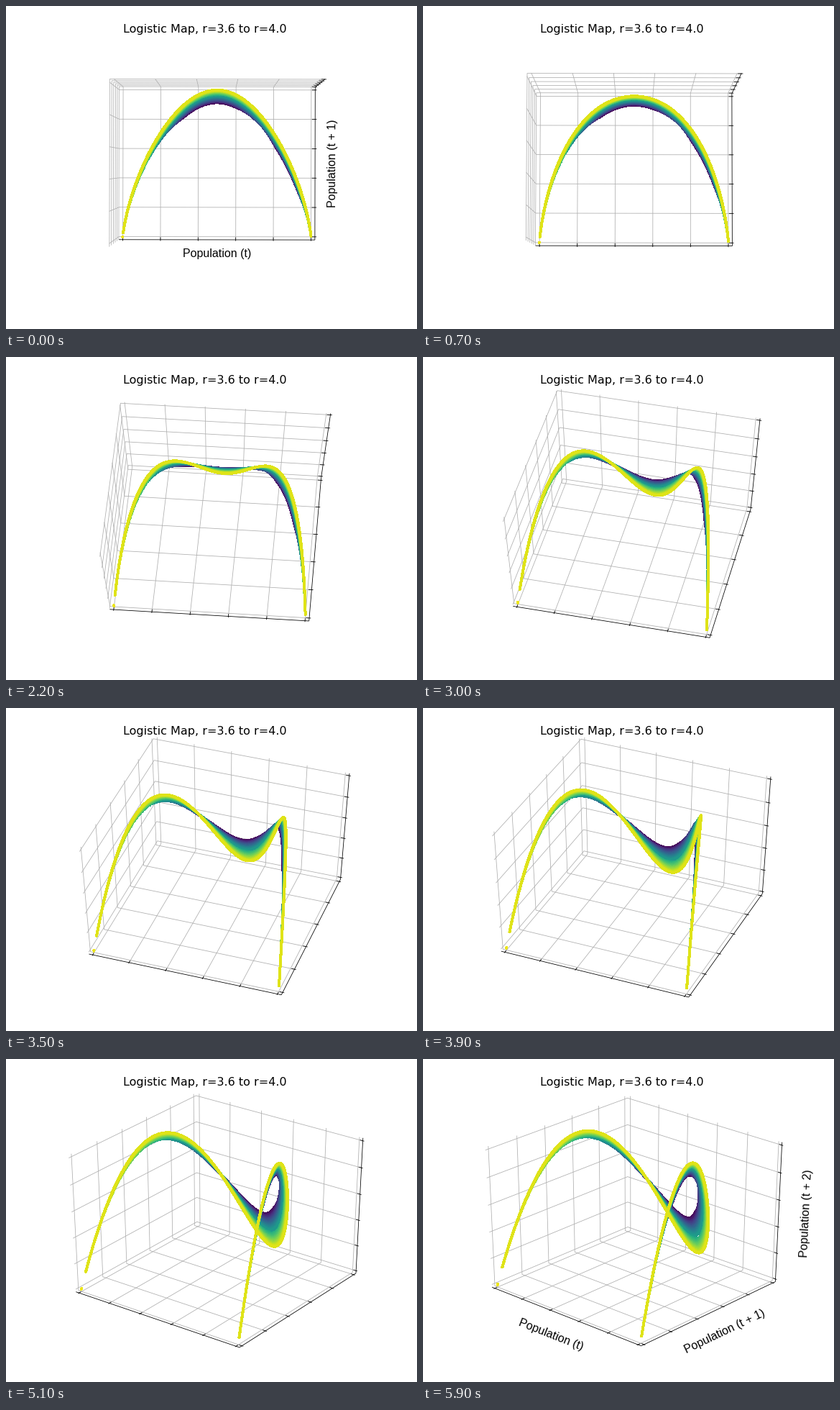
A matplotlib script that plays this animation: 572x449 px, repeating every 6.13 s.

```python
import matplotlib.pyplot as plt
import numpy as np
from matplotlib.animation import FuncAnimation
from matplotlib.collections import LineCollection

W, H, DPI = 572, 449, 72
LOOP_MS, FRAMES = 6130, 123

# Perspective: scale and centre of the plot area in pixels
SCALE = np.array([558, 434.88]) / 0.185
CENTER = 7.2 + SCALE * 0.095
DIST = 11.0

# Camera moves: (steps, elevation drop per step, azimuth gain per step)
MOVES = [(3, 0.5, 0), (14, 1.0, 0), (24, 1.5, 1.1),
         (4, 1.0, 1.1), (9, 0.5, 1.1), (3, 0.2, 0.5)]
COUNTS, DROPS, TURNS = zip(*MOVES)
ELEV = 89.9 - np.append(0, np.cumsum(np.repeat(DROPS, COUNTS)))
AZIM = 270.1 + np.append(0, np.cumsum(np.repeat(TURNS, COUNTS)))
FINAL_SLOT = len(ELEV) + 1

# Box edges, ticks and labels
LO, HI = -1 / 48, 49 / 48
FAR, NEAR = (LO, HI, LO), (HI, LO, HI)
EDGES = [(LO, LO, LO), (HI, LO, LO), (HI, HI, LO)]
TICKS = np.linspace(0, 1, 6)
TICK_DIRS = [(1, 1), (0, -1), (0, -1)]
DELTA = 1 / 12
LABEL_SHIFT = 25 * 48 / (558 + 434.88) * DELTA
NAMES = ["Population (t)", "Population (t + 1)", "Population (t + 2)"]


def project(points, elev, azim):
    """Perspective view of unit-cube points, in pixels."""
    x, y, z = np.moveaxis(np.asarray(points, float) - 0.5, -1, 0)
    e, a = np.radians([elev, azim])
    toward = x * np.cos(a) + y * np.sin(a)
    right = y * np.cos(a) - x * np.sin(a)
    up = z * np.cos(e) - toward * np.sin(e)
    depth = DIST - toward * np.cos(e) - z * np.sin(e)
    return CENTER + SCALE * np.stack([right, up], -1) / depth[..., None]


def moved(point, axis, value):
    result = list(point)
    result[axis] = value
    return result


def orbit(rate, count=4000, discard=100):
    x, values = 0.5, []
    for _ in range(count):
        values.append(x)
        x = rate * x * (1 - x)
    return np.sort(values[discard:])


def attractor(rate, gap=0.008, pad=2e-4):
    """Pieces of the delay curve (x, f(x), f(f(x))) that the orbit visits."""
    pieces = []
    xs = orbit(rate)
    for run in np.split(xs, np.flatnonzero(np.diff(xs) > gap) + 1):
        lo, hi = run[0] - pad, run[-1] + pad
        x = np.linspace(lo, hi, 3 + int((hi - lo) * 160))
        y = rate * x * (1 - x)
        pieces.append(np.stack([x, y, rate * y * (1 - y)], -1))
    return pieces


def build_grid():
    lines = []
    for axis in range(3):
        for value in TICKS:
            corner = moved(FAR, axis, value)
            b, c = (axis + 1) % 3, (axis + 2) % 3
            lines.append([moved(corner, b, NEAR[b]), corner,
                          moved(corner, c, NEAR[c])])
    return lines


def build_axes():
    lines = []
    for axis, (edge, (side, sign)) in enumerate(zip(EDGES, TICK_DIRS)):
        lines.append([moved(edge, axis, LO), moved(edge, axis, HI)])
        for value in TICKS:
            base = moved(edge, axis, value)
            lines.append([moved(base, side, base[side] + k * sign * DELTA)
                          for k in (0.2, -0.1)])
    return lines


def label_anchor(axis):
    point = [c + (LABEL_SHIFT if c > 0.5 else -LABEL_SHIFT)
             for c in EDGES[axis]]
    return moved(point, axis, 0.5)


def upright(angle):
    angle %= 180
    return angle - 180 if angle > 90 else angle


fig = plt.figure(figsize=(W / DPI, H / DPI), dpi=DPI, facecolor="white")
ax = fig.add_axes([0, 0, 1, 1])
ax.set(xlim=(0, W), ylim=(0, H))
ax.axis("off")

curves, colors = [], []
rates = np.linspace(3.6, 4.0, 50)
for rate, color in zip(rates, plt.cm.viridis(np.linspace(0, 0.97, 50))):
    pieces = attractor(rate)
    curves += pieces
    colors += [color] * len(pieces)

grid_lines, axis_lines = build_grid(), build_axes()
grid = LineCollection([], colors="#b0b0b0", linewidths=0.8, zorder=1)
frame_art = LineCollection([], colors="black", linewidths=0.8, zorder=2)
ribbon = LineCollection([], colors=colors, linewidths=3, capstyle="round",
                        antialiaseds=False, zorder=3)
layers = [(grid, grid_lines), (frame_art, axis_lines), (ribbon, curves)]
for art, _ in layers:
    ax.add_collection(art, autolim=False)

labels = [ax.text(0, 0, name, family="Liberation Sans", size=16,
                  ha="center", va="center", rotation_mode="default")
          for name in NAMES]
ax.text(277.2, 424.5, "Logistic Map, r=3.6 to r=4.0",
        family="DejaVu Sans", size=16, ha="center", va="top")


def update(frame):
    slot = frame // 2
    step = int(np.clip(slot - 1, 0, len(ELEV) - 1))
    view = ELEV[step], AZIM[step]
    for art, lines in layers:
        art.set_segments([project(line, *view) for line in lines])

    # Labels only show while the camera rests
    shown = 2 if slot < 2 else 3 if slot >= FINAL_SLOT else 0
    for axis, label in enumerate(labels):
        label.set_visible(axis < shown)
        start, end = project([moved(EDGES[axis], axis, LO),
                              moved(EDGES[axis], axis, HI)], *view)
        dx, dy = end - start
        label.set_position(project(label_anchor(axis), *view))
        label.set_rotation(upright(np.degrees(np.arctan2(dy, dx))))
    return [grid, frame_art, ribbon, *labels]


anim = FuncAnimation(fig, update, frames=FRAMES, interval=LOOP_MS / FRAMES,
                     repeat=True, repeat_delay=0, blit=False)
plt.show()
```
